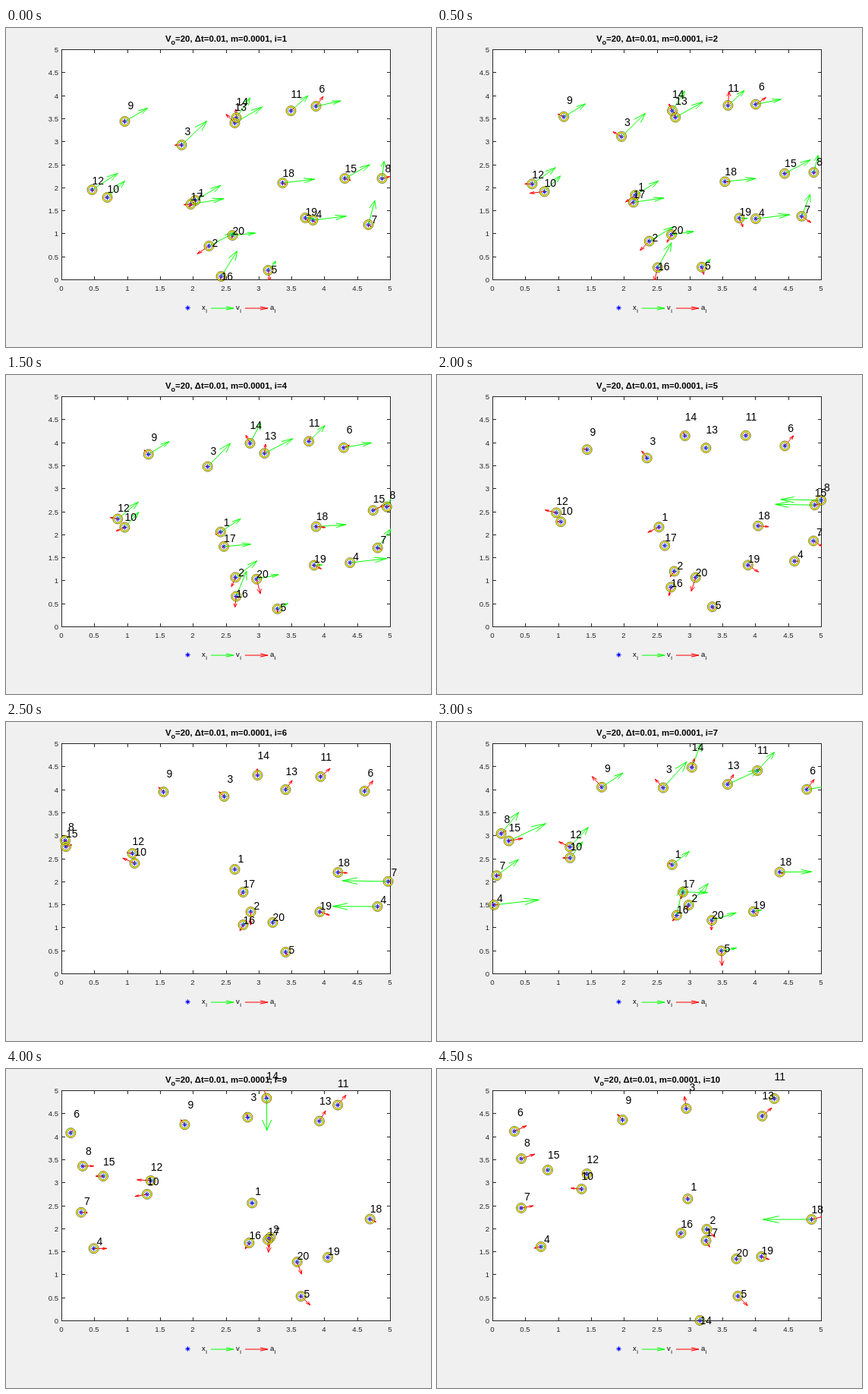
Animation, 560 px wide and 420 px high, one loop 5000 ms. Source, as an HTML page with a canvas:

```html
<!DOCTYPE html>
<html lang="en">
<head>
<meta charset="utf-8">
<title>Particles in a box</title>
<style>
html, body { margin: 0; width: 100%; height: 100%; overflow: hidden; background: #f0f0f0; }
canvas { display: block; }
</style>
</head>
<body>
<canvas id="stage" width="560" height="420"></canvas>
<script>
const ctx = document.getElementById("stage").getContext("2d");
const FONT = '"Liberation Sans", Arial, sans-serif';
const INK = "#262626", GREEN = "#00ff00", RED = "#ff0000", OLIVE = "#404000";
const STEP = 500, STEPS = 10, MID = 5, END = 9;
const box = { x: 73, y: 28, w: 433.5, h: 303.5 };
const right = box.x + box.w, bottom = box.y + box.h;
const ux = box.w / 5, uy = box.h / 5;

// Start, middle and end point of each particle, before wrapping at the walls.
const dots = [
  [249, 226, 301, 193, 330, 170], [267, 286, 322, 249, 355, 210],
  [231, 153, 287, 97, 328, 51], [404, 252, 489, 242, 570, 233],
  [345, 318, 368, 302, 396, 298], [408, 102, 472, 90, 535, 81],
  [477, 258, 503, 209, 544, 182], [495, 197, 511, 155, 544, 117],
  [156, 122, 207, 91, 244, 66], [133, 222, 169, 185, 190, 157],
  [375, 108, 414, 71, 444, 38], [113, 212, 166, 172, 197, 137],
  [301, 124, 368, 88, 428, 61], [303, 117, 331, 69, 346, 26.5],
  [446, 197, 512, 163, 579, 132], [283, 326, 312, 266, 321, 215],
  [243, 231, 312, 223, 354, 225], [364, 203, 437, 197, 493, 197],
  [394, 249, 413, 249, 427, 246], [298, 272, 351, 263, 394, 249]
];

const mod = (v, n) => ((v % n) + n) % n;
const rand = (i, j) => mod(Math.sin(i * 12.9898 + j * 78.233) * 43758.5453, 1);

// Parabola through the three points.
function place([x0, y0, x1, y1, x2, y2], s) {
  const a = (s - MID) * (s - END) / (MID * END);
  const b = s * (s - END) / (MID * (MID - END));
  const c = s * (s - MID) / (END * (END - MID));
  const x = a * x0 + b * x1 + c * x2 + 0.5;
  const y = a * y0 + b * y1 + c * y2 + 1;
  return { x: box.x + mod(x - box.x, box.w), y: box.y + mod(y - box.y, box.h) };
}

// Outward from the middle of the cloud, across the side walls, with some noise.
function push(p, i, step) {
  const dx = mod(p.x - 340 + box.w / 2, box.w) - box.w / 2;
  const angle = Math.atan2(p.y - 190, dx) + (rand(i, step) - 0.5) * 0.8;
  const len = 20 * rand(i + 40, step);
  return { x: len * Math.cos(angle), y: len * Math.sin(angle) };
}

function line(...pts) {
  ctx.beginPath();
  for (let i = 0; i < pts.length; i += 2) ctx.lineTo(pts[i], pts[i + 1]);
  ctx.stroke();
}

function arrow(x, y, dx, dy, color) {
  const tx = x + dx, ty = y + dy, a = 0.33, b = a * 0.3;
  const sx = b * dy * ux / uy, sy = b * dx * uy / ux;
  ctx.strokeStyle = color;
  ctx.lineWidth = 1;
  line(x, y, tx, ty);
  line(tx - a * dx + sx, ty - a * dy - sy, tx, ty, tx - a * dx - sx, ty - a * dy + sy);
}

function star(x, y) {
  ctx.strokeStyle = "#0000ff";
  ctx.lineWidth = 1;
  for (let k = 0; k < 4; k++) {
    const cx = 3.2 * Math.cos(k * Math.PI / 4), cy = 3.2 * Math.sin(k * Math.PI / 4);
    line(x - cx, y - cy, x + cx, y + cy);
  }
}

function circle(x, y, r, color, width) {
  ctx.strokeStyle = color;
  ctx.lineWidth = width;
  ctx.beginPath();
  ctx.arc(x, y, r, 0, Math.PI * 2);
  ctx.stroke();
}

function ring(x, y) {
  circle(x, y, 5.5, "#ffff00", 1.4);
  circle(x, y, 6.5, OLIVE, 0.7);
  circle(x, y, 4.6, OLIVE, 0.6);
}

function text(str, x, y, size, align = "left", color = INK, weight = "") {
  ctx.font = `${weight} ${size}px ${FONT}`;
  ctx.textAlign = align;
  ctx.fillStyle = color;
  ctx.fillText(str, x, y);
  return ctx.measureText(str).width;
}

function axes() {
  ctx.fillStyle = "#fff";
  ctx.fillRect(box.x, box.y, box.w, box.h);
  ctx.strokeStyle = INK;
  ctx.lineWidth = 1;
  ctx.strokeRect(73.5, 28.5, 433, 303);
  for (let i = 0; i <= 10; i++) {
    const x = Math.round(73 + i * 43.3) + 0.5;
    const y = Math.round(331 - i * 30.3) + 0.5;
    line(x, 331.5, x, 327);
    line(x, 28.5, x, 33);
    line(73.5, y, 78, y);
    line(506.5, y, 502, y);
    text(i / 2, x - 0.5, 346, 9.6, "center");
    text(i / 2, 69, y + 3.5, 9.6, "right");
  }
}

function title(n) {
  const size = 11.4;
  const parts = [["V", size, 0], ["o", 9, 4], [`=20, Δt=0.01, m=0.0001, i=${n}`, size, 0]];
  let x = 290;
  for (const [str, px] of parts) {
    ctx.font = `bold ${px}px ${FONT}`;
    x -= ctx.measureText(str).width / 2;
  }
  for (const [str, px, drop] of parts) x += text(str, x, 18 + drop, px, "left", "#000", "bold");
}

function legend() {
  star(239.5, 368.5);
  arrow(270, 369, 30, 0, GREEN);
  arrow(315, 369, 30, 0, RED);
  ["x", "v", "a"].forEach((name, i) => {
    const x = 258 + 45 * i;
    const w = text(name, x, 371, 9.5, "left", "#000");
    text("i", x + w + 0.5, 375, 7.5, "left", "#000");
  });
}

function particles(step) {
  const now = dots.map(d => place(d, step));
  const moves = dots.map((d, i) => {
    const next = place(d, step + 1);
    return { x: next.x - now[i].x, y: next.y - now[i].y };
  });
  // The spread of the cloud sets the longest velocity arrow.
  const span = key => Math.max(...now.map(p => p[key])) - Math.min(...now.map(p => p[key]));
  const size = (x, y) => Math.hypot(x / ux, y / uy);
  const longest = Math.max(...moves.map(m => size(m.x, m.y)));
  const scale = 0.5 / Math.sqrt(dots.length) * size(span("x"), span("y")) / longest;

  now.forEach(p => star(p.x, p.y));
  ctx.save();
  ctx.beginPath();
  ctx.rect(box.x, box.y, box.w + 0.5, box.h + 0.5);
  ctx.clip();
  now.forEach((p, i) => arrow(p.x, p.y, moves[i].x * scale, moves[i].y * scale, GREEN));
  now.forEach((p, i) => {
    const a = push(p, i, step);
    arrow(p.x, p.y, a.x, a.y, RED);
  });
  ctx.restore();
  now.forEach(p => ring(p.x, p.y));
  now.forEach((p, i) => {
    const y = p.y - 0.1 * (bottom - p.y) + 5;
    text(String(i + 1).padStart(2), p.x, y, 14, "left", "#000");
  });
}

function draw(step) {
  ctx.fillStyle = "#f0f0f0";
  ctx.fillRect(0, 0, 560, 420);
  axes();
  particles(step);
  title(step + 1);
  legend();
}

const start = performance.now();
function tick() {
  const t = Math.max(0, performance.now() - start);
  draw(Math.floor(t / STEP) % STEPS);
  requestAnimationFrame(tick);
}
tick();
</script>
</body>
</html>
```
